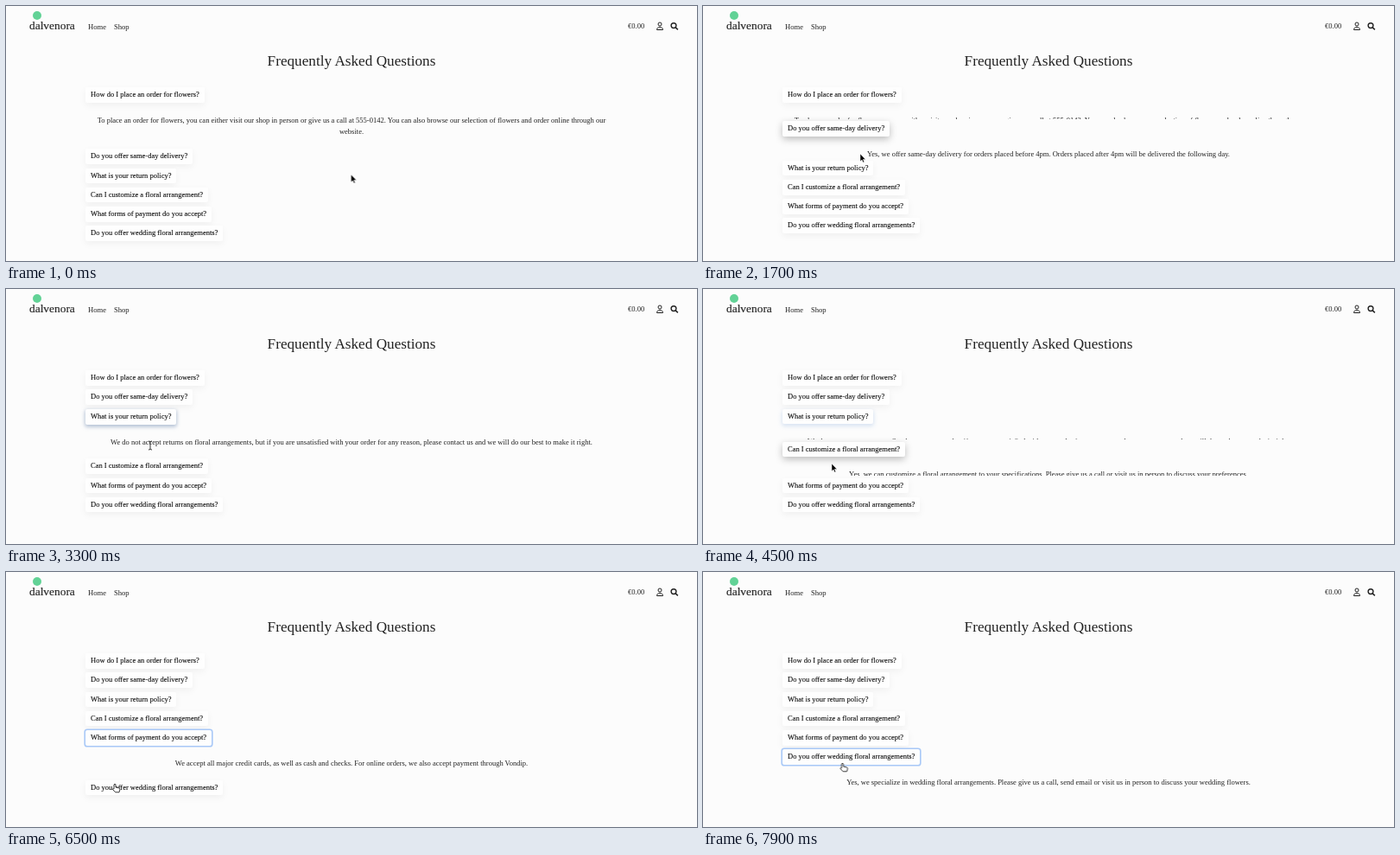
An HTML page for the animation above (8 s loop, 800x295 px).

```html
<!DOCTYPE html>
<html lang="en">
<head>
<meta charset="utf-8">
<title>Frequently Asked Questions</title>
<style>
  html, body { margin: 0; width: 100%; height: 100%; overflow: hidden; background: #fcfcfc; }
  body { position: relative; color: #222; font: 8.5px "Liberation Serif", "Times New Roman", serif; }
  svg { position: absolute; left: 0; top: 0; width: 800px; height: 295px; }
  svg text { fill: #222; }
  #list { position: absolute; left: 92px; top: 91.9px; width: 616px; }
  .row { height: 22.2px; display: flex; align-items: center; }
  .question {
    box-sizing: border-box; height: 17.6px; padding: 0 6px; border-radius: 2px;
    background: #fefefe; color: #0c0c0c; line-height: 17.6px; white-space: nowrap;
    -webkit-text-stroke: .1px #0c0c0c; position: relative; z-index: 1;
  }
  .panel { height: 0; overflow: hidden; }
  .panel p {
    margin: 0; padding: 11.7px 0 10.5px; line-height: 13.4px;
    text-align: center; white-space: pre;
  }
  #cursor { z-index: 2; pointer-events: none; }
</style>
</head>
<body>
<svg viewBox="0 0 800 295">
  <circle cx="36" cy="11" r="5" fill="#62d296"/>
  <text x="27" y="27" font-size="13.4" stroke="#222" stroke-width=".15">dalvenora</text>
  <text x="95" y="26.7" font-size="8.6">Home</text>
  <text x="125" y="26.7" font-size="8.6">Shop</text>
  <text x="720" y="26.4">€0.00</text>
  <g fill="none" stroke="#222">
    <circle cx="757" cy="21" r="2"/>
    <path d="M753.5 27.5c0-4.2 7-4.2 7 0z" stroke-linejoin="round"/>
    <circle cx="773" cy="22.6" r="2.9" stroke-width="1.4"/>
    <path d="M775.2 24.8L777.8 27.4" stroke-width="1.6"/>
  </g>
  <text x="400" y="69" font-size="17.2" text-anchor="middle">Frequently Asked Questions</text>
</svg>

<div id="list"></div>

<svg id="cursor" viewBox="0 0 800 295">
  <g id="pointer">
    <path id="arrow" d="M0 0V8.8L2 7 3.3 10 4.7 9.4 3.4 6.4H6.1z" stroke="#fff" stroke-width=".5"/>
    <path id="hand" d="M-1 1q1-1.7 2 0V4l3.7.9q1.5.4 1.2 2L5 9.8H.6L-2.4 6.6q-.2-1.5 1.4-.7z"
      fill="#fff" stroke="#222" stroke-width=".9" stroke-linejoin="round"/>
    <path id="beam" d="M-2-5q2 0 2 1.2q0-1.2 2-1.2M0-3.8V3.8M-2 5q2 0 2-1.2q0 1.2 2 1.2"
      fill="none" stroke="#222" stroke-width=".9"/>
  </g>
</svg>

<script>
const LOOP = 8000, SLIDE = 350;
const REST = '0 3px 8px 0 rgba(0,0,0,.05)';
const PRESSED = '0 3px 8px 0 rgba(0,0,0,.26)';
const FOCUSED = '0 0 0 1.6px rgb(168,200,247)';

const faq = [
  { ask: 'How do I place an order for flowers?', close: 1567,
    reply: 'To place an order for flowers, you can either visit our shop in person or give us a call at 555-0142. You can also browse our selection of flowers and order online through our\nwebsite.' },
  { ask: 'Do you offer same-day delivery?', open: 1567, close: 3020,
    reply: 'Yes, we offer same-day delivery for orders placed before 4pm. Orders placed after 4pm will be delivered the following day.' },
  { ask: 'What is your return policy?', open: 3020, close: 4388,
    reply: 'We do not accept returns on floral arrangements, but if you are unsatisfied with your order for any reason, please contact us and we will do our best to make it right.' },
  { ask: 'Can I customize a floral arrangement?', open: 4388, close: 5510,
    reply: 'Yes, we can customize a floral arrangement to your specifications. Please give us a call or visit us in person to discuss your preferences.' },
  { ask: 'What forms of payment do you accept?', open: 5510, close: 6880,
    reply: 'We accept all major credit cards, as well as cash and checks. For online orders, we also accept payment through Vondip.' },
  { ask: 'Do you offer wedding floral arrangements?', open: 6880,
    reply: 'Yes, we specialize in wedding floral arrangements. Please give us a call, send email or visit us in person to discuss your wedding flowers.' }
];

// Points are [time, value]; the easing applies between neighbouring points.
function track(el, prop, points, easing) {
  const all = [[0, points[0][1]], ...points, [LOOP, points.at(-1)[1]]];
  el.animate(all.map(([t, value]) => ({ offset: t / LOOP, [prop]: value, easing })),
    { duration: LOOP, iterations: Infinity });
}

function add(parent, tag, className, text = '') {
  const el = parent.appendChild(document.createElement(tag));
  el.className = className;
  el.textContent = text;
  return el;
}

const list = document.getElementById('list');
for (const { ask, reply, open, close } of faq) {
  const question = add(add(list, 'div', 'row'), 'div', 'question', ask);
  const panel = add(list, 'div', 'panel');
  add(panel, 'p', '', reply);

  const full = 22.2 + 13.4 * reply.split('\n').length + 'px';
  const heights = [], shadows = [];
  if (open) {
    heights.push([open, '0px'], [open + SLIDE, full]);
    shadows.push([open - 80, REST], [open, PRESSED], [open + 150, PRESSED], [open + 450, FOCUSED]);
  }
  if (close) {
    heights.push([close, full], [close + SLIDE, '0px']);
    if (open) shadows.push([close - 50, FOCUSED], [close + 200, REST]);
  }
  track(panel, 'height', heights, 'ease');
  track(question, 'boxShadow', shadows.length ? shadows : [[0, REST]], 'linear');
}

const path = [
  [100, 399.5, 195], [600, 253.5, 138.5], [900, 253.5, 138.5], [1400, 182, 171],
  [2400, 182, 171], [2900, 167, 181], [3400, 167, 181], [4100, 149, 202],
  [5000, 149, 202], [5300, 134, 223.5], [6000, 134, 223.5], [6500, 126, 245],
  [6800, 104.5, 246], [7450, 104.5, 246], [7900, 161.5, 221]
];
track(document.getElementById('pointer'), 'transform',
  path.map(([t, x, y]) => [t, `translate(${x}px, ${y}px)`]), 'ease-in-out');

const shapes = [
  [0, 'arrow'], [1250, 'hand'], [1620, 'arrow'], [2650, 'hand'], [3100, 'beam'],
  [3600, 'arrow'], [3900, 'hand'], [4440, 'arrow'], [5200, 'hand'], [5600, 'arrow'],
  [6250, 'hand'], [6960, 'arrow'], [7800, 'hand']
];
for (const id of ['arrow', 'hand', 'beam'])
  track(document.getElementById(id), 'opacity',
    shapes.map(([t, shape]) => [t, shape === id ? 1 : 0]), 'step-end');
</script>
</body>
</html>
```
